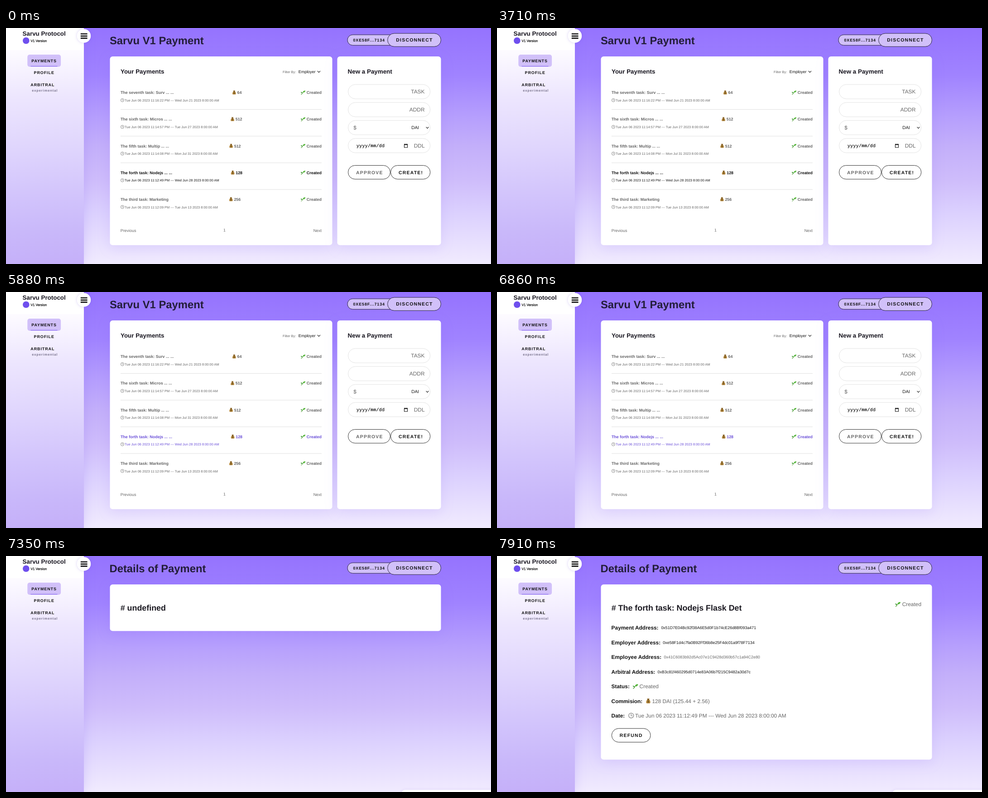
An HTML page that plays this animation: 1071x523 px, repeating every 8 s.

```html
<!DOCTYPE html>
<html lang="en">
<head>
<meta charset="utf-8">
<title>Sarvu V1 Payment</title>
<style>
html, body { margin: 0; width: 100%; height: 100%; overflow: hidden; }
svg { display: block; width: 1071px; height: 523px; }
text { font-family: "Liberation Sans", Arial, sans-serif; font-size: 8.93px; fill: #111; text-rendering: geometricPrecision; white-space: pre; }
.b { font-weight: 700; }
.s { font-size: 7.44px; }
.m { font-size: 9.92px; }
.l { font-size: 11.9px; }
.h { font-size: 13.39px; font-weight: 700; fill: #17151f; }
.h2 { font-size: 17.86px; font-weight: 700; fill: #1c1a22; }
.h1 { font-size: 23.8px; font-weight: 700; fill: #221d38; }
.g { fill: #666; }
.end { text-anchor: end; }
.nav { font-weight: 700; letter-spacing: .93px; }
.btn { font-size: 10.42px; font-weight: 700; letter-spacing: 1.25px; }
.mono { font-family: "Liberation Mono", "Courier New", monospace; font-size: 9.92px; letter-spacing: .28px; stroke: #111; stroke-width: .2px; }
.card { fill: #fff; filter: drop-shadow(0 6px 14px rgba(120, 85, 240, .13)); }
.line { stroke: #e0e0e0; }
.field { fill: #fff; stroke: #e3e3e3; }
.pill { fill: #d1c0f9; stroke: #2a2440; }
.ghost { fill: #fff; stroke: #333; }
.chev { fill: none; stroke: #222; stroke-width: 1.2; }
.row text { fill: #666; }

.list, .details, .connect, .account, .pending, .loaded { animation: 8s step-end infinite; }
.list { animation-name: list; }
.details { animation-name: details; }
.connect { animation-name: connect; }
.account { animation-name: account; }
.pending { animation-name: pending; }
.loaded { animation-name: loaded; }
.settle { animation: settle 8s step-end infinite; }
.version { stroke: #111; stroke-width: .25px; animation: version 8s step-end infinite; }
.row.active text { animation: hover 8s infinite; }
.toast { fill: #fff; animation: toast 8s infinite; filter: drop-shadow(0 0 3px rgba(90, 60, 200, .12)); }

@keyframes list { 0% { visibility: visible } 86.625%, 100% { visibility: hidden } }
@keyframes details { 0% { visibility: hidden } 86.625%, 100% { visibility: visible } }
@keyframes connect { 0% { visibility: hidden } 86.625% { visibility: visible } 89.25%, 100% { visibility: hidden } }
@keyframes account { 0% { visibility: visible } 86.625% { visibility: hidden } 89.25%, 100% { visibility: visible } }
@keyframes pending { 0% { visibility: hidden } 86.625% { visibility: visible } 92.75%, 100% { visibility: hidden } }
@keyframes loaded { 0% { visibility: hidden } 92.75%, 100% { visibility: visible } }
@keyframes settle { 0% { transform: none } 86.625% { transform: translate(.2px, -.6px) } 89.25%, 100% { transform: none } }
@keyframes version { 0% { stroke-width: .25px } 86.625% { stroke-width: 0 } 89.25%, 100% { stroke-width: .25px } }
@keyframes hover {
  0%, 51.1% { fill: #111; animation-timing-function: ease }
  54.9%, 100% { fill: #6b50d8 }
}
@keyframes toast {
  0%, 90% { transform: translateY(12px); animation-timing-function: ease-out }
  91.875%, 100% { transform: none }
}
</style>
</head>
<body>
<svg viewBox="0 0 1071 523">
  <defs>
    <linearGradient id="sky" x2="0" y2="1">
      <stop offset="0" stop-color="#9573fe"/>
      <stop offset=".2" stop-color="#a083ff"/>
      <stop offset=".38" stop-color="#b69ffd"/>
      <stop offset=".5" stop-color="#c3affa"/>
      <stop offset=".64" stop-color="#cebcfb"/>
      <stop offset=".78" stop-color="#dbd0fe"/>
      <stop offset="1" stop-color="#f1ebfe"/>
    </linearGradient>
    <linearGradient id="side" x2="0" y2="1">
      <stop offset="0" stop-color="#fdfbff"/>
      <stop offset=".22" stop-color="#ede6fe"/>
      <stop offset=".45" stop-color="#e0d6fd"/>
      <stop offset=".68" stop-color="#d2c4fc"/>
      <stop offset=".85" stop-color="#c9b8fa"/>
      <stop offset="1" stop-color="#c5b0f9"/>
    </linearGradient>
    <g id="sprout">
      <path d="M-4.6 4.4Q-1.5 2.6-.8-.6" fill="none" stroke="#4f9e35" stroke-width="1.1"/>
      <path d="M-.8-.2C-.6-3.4 2-4.6 5-4.2 4.6-1 2.2.6-.8-.2Z" fill="#57b63c"/>
      <path d="M-1.2 1C-2.4-1.4-4-1.6-5.4-1.2-4.8.8-3.2 1.8-1.2 1Z" fill="#3f9a34"/>
    </g>
    <g id="bag">
      <path d="M-1.7-2.2C-4.2 0-4.6 4.5-2.6 4.5H2.6C4.6 4.5 4.2 0 1.7-2.2Z" fill="#b5883c"/>
      <path d="M-2-4.5 0-4 2-4.5 1.5-2H-1.5Z" fill="#8d6526"/>
      <path d="M-1.7-2H1.7" stroke="#5d4218" stroke-width=".8"/>
      <path d="M1.1 0H-.6Q-1.4 1 0 1.3 1.4 1.8.5 2.8H-1.1M0-.6V3.4" fill="none" stroke="#4d3a17" stroke-width=".7"/>
    </g>
    <g id="clock">
      <circle r="3.7" fill="#f4f4f4" stroke="#858585" stroke-width=".8"/>
      <path d="M0-2.4V.2H2" fill="none" stroke="#777" stroke-width=".6"/>
    </g>
  </defs>

  <rect width="1071" height="523" fill="url(#sky)"/>

  <g class="list">
    <text class="h1" x="229" y="35.5">Sarvu V1 Payment</text>
    <rect class="card" x="229.5" y="63" width="491" height="418.3" rx="6"/>
    <text class="h" x="253" y="101.4">Your Payments</text>
    <text class="s g" x="611" y="99.8">Filter By:</text>
    <text x="645.8" y="100">Employer</text>
    <path class="chev" d="M687.8 95.2l3.1 3.1 3.1-3.1"/>
    <g id="rows"></g>
    <text class="g" x="252.7" y="451.6">Previous</text>
    <text class="g" x="480" y="451.4">1</text>
    <text class="g end" x="697" y="451.6">Next</text>

    <rect class="card" x="731.5" y="63" width="229" height="418.3" rx="6"/>
    <text class="h" x="754.6" y="101.4">New a Payment</text>
    <g id="fields"></g>
    <text class="l g end" x="924.5" y="145.2">TASK</text>
    <text class="l g end" x="924.5" y="185.2">ADDR</text>
    <text class="l g" x="767.3" y="225">$</text>
    <text class="m" x="895.3" y="224.4">DAI</text>
    <path class="chev" d="M927.6 219.3l2.9 3 2.9-3"/>
    <text class="mono" x="774" y="264.4">yyyy/mm/dd</text>
    <path d="M879.5 257.7h7v7h-7zM879.5 258.6h7M881 256.6v1M885 256.6v1" fill="none" stroke="#111" stroke-width="1.1"/>
    <text class="l g end" x="924.5" y="265">DDL</text>
    <rect class="ghost" x="755.5" y="304.5" width="93" height="30.5" rx="15.2"/>
    <text class="btn g" x="773" y="323.6">APPROVE</text>
    <rect class="ghost" x="849.5" y="304.5" width="87.3" height="30.5" rx="15.2"/>
    <text class="btn" x="867" y="323.6">CREATE!</text>
  </g>

  <g class="details">
    <text class="h1 settle" x="228.5" y="35.5">Details of Payment</text>
  </g>
  <g class="pending">
    <rect class="card" x="229.5" y="63" width="731" height="103.2" rx="6"/>
    <text class="h2 settle" x="252.7" y="121.3"># undefined</text>
  </g>
  <g class="loaded">
    <rect class="card" x="229.5" y="63" width="731" height="388.3" rx="6"/>
    <text class="h2" x="252.7" y="121.3"># The forth task: Nodejs Flask Det</text>
    <use href="#sprout" transform="translate(885.3 107) scale(1.15)"/>
    <text class="l g end" x="937" y="111.3">Created</text>
    <g id="facts"></g>
    <use href="#sprout" transform="translate(305.8 289) scale(1.15)"/>
    <use href="#bag" transform="translate(334 321) scale(1.2)"/>
    <use href="#clock" transform="translate(296.2 353.6) scale(1.5)"/>
    <rect class="ghost" x="253.3" y="382.2" width="85.7" height="30.4" rx="15.2"/>
    <text class="btn" x="270.8" y="401.2">REFUND</text>
  </g>

  <g class="account">
    <rect class="pill" x="754" y="15" width="116" height="23.3" rx="11.6"/>
    <text class="nav" x="766.4" y="29.8">0XE58F...7134</text>
  </g>
  <rect class="pill" x="842.6" y="12" width="117.8" height="29.2" rx="14.6"/>
  <text class="btn account" x="861.3" y="30.3">DISCONNECT</text>
  <text class="btn connect" x="871.6" y="30.3">CONNECT</text>

  <rect class="toast" x="873" y="518.3" width="220" height="40" rx="8"/>

  <g style="filter: drop-shadow(0 0 12px rgba(120, 85, 240, .2))">
    <rect width="172" height="523" fill="#fff"/>
  </g>
  <rect y="49" width="172" height="474" fill="url(#side)"/>
  <circle cx="172" cy="17.5" r="15.2" fill="#fff" style="filter: drop-shadow(0 0 3px rgba(110, 80, 220, .25))"/>
  <path d="M164.8 13h14.8M164.8 17.8h14.8M164.8 22.6h14.8" stroke="#141414" stroke-width="2.7"/>
  <circle cx="44.3" cy="28" r="7.3" fill="#6f4fee"/>
  <rect x="47.3" y="59" width="73.8" height="27" rx="5" fill="#d1c0f9"/>
  <path d="M54.5 84.8H113.5" stroke="#7b5cf0" stroke-width="1.1"/>
  <g class="settle">
    <text class="h" x="36.6" y="16.8">Sarvu Protocol</text>
    <text class="version" x="54.4" y="31" style="font-size: 7.4px">V1 Version</text>
    <text class="nav" x="56.3" y="75.6">PAYMENTS</text>
    <text class="nav" x="61.6" y="102.2">PROFILE</text>
    <text class="nav" x="54.3" y="128.9">ARBITRAL</text>
    <text class="nav s" x="57.2" y="140.5" style="fill: #77718a">experimental</text>
  </g>
</svg>
<script>
const $ = id => document.getElementById(id);
const text = (x, y, str, cls = '') => `<text class="${cls}" x="${x}" y="${y}">${str}</text>`;
const icon = (name, x, y) => `<use href="#${name}" x="${x}" y="${y}"/>`;

// title, amount, amount x, start, end
const tasks = [
  ['The seventh task: Surv ... ...', 64, 510.5, '11:16:22', 'Wed Jun 21'],
  ['The sixth task: Micros ... ...', 512, 506.7, '11:14:57', 'Tue Jun 27'],
  ['The fifth task: Multip ... ...', 512, 503.7, '11:14:08', 'Mon Jul 31'],
  ['The forth task: Nodejs ... ...', 128, 507.2, '11:12:49', 'Wed Jun 28'],
  ['The third task: Marketing', 256, 503.4, '11:12:09', 'Tue Jun 13']
];
const span = (from, to) => `Tue Jun 06 2023 ${from} PM --- ${to} 2023 8:00:00 AM`;

$('rows').innerHTML = tasks.map(([title, sum, x, from, to], i) => {
  const y = 143 + i * 59.15;
  const rule = i < 4 ? `<path class="line" d="M253 ${y + 37.5}H697"/>` : '';
  return `<g class="row${i === 3 ? ' active' : ''}">`
    + text(252.9, y + 3.3, title, 'b')
    + icon('bag', x - 6.6, y - .3) + text(x, y + 3.3, sum, 'b')
    + icon('sprout', 656.2, y) + text(697, y + 3.3, 'Created', 'b end')
    + icon('clock', 257, y + 17) + text(262, y + 19.9, span(from, to), 's')
    + rule + '</g>';
}).join('');

$('fields').innerHTML = [0, 1, 2, 3].map(i =>
  `<rect class="field" x="755.5" y="${125.2 + i * 39.85}" width="181.2" height="31.8" rx="15.9"/>`).join('');

// label, value x, value, value style
const facts = [
  ['Payment Address:', 362.4, '0x51D7E04Bc92f38A6E5d0F1b74cE26d8Bf093a471', ''],
  ['Employer Address:', 366.3, '0xe58F1d4c7fa0B92Ff36b8e25F4dc01a9f78F7134', ''],
  ['Employee Address:', 368.5, '0x41C6083b92d5Ac07e1C9428d360b57c1a94C2e80', 'g'],
  ['Arbitral Address:', 354.6, '0xB3c81f460295d0714e83A06b7f215C9482a30d7c', ''],
  ['Status:', 314.6, 'Created', 'l g'],
  ['Commision:', 342.4, '128 DAI (125.44 + 2.56)', 'l g'],
  ['Date:', 305, span('11:12:49', 'Wed Jun 28'), 'l g']
];
$('facts').innerHTML = facts.map(([label, x, value, cls], i) => {
  const y = 163 + i * 32.53;
  return text(252.6, y, label, 'l b') + text(x, cls.includes('l') ? y : y - 1, value, cls);
}).join('');
</script>
</body>
</html>
```
